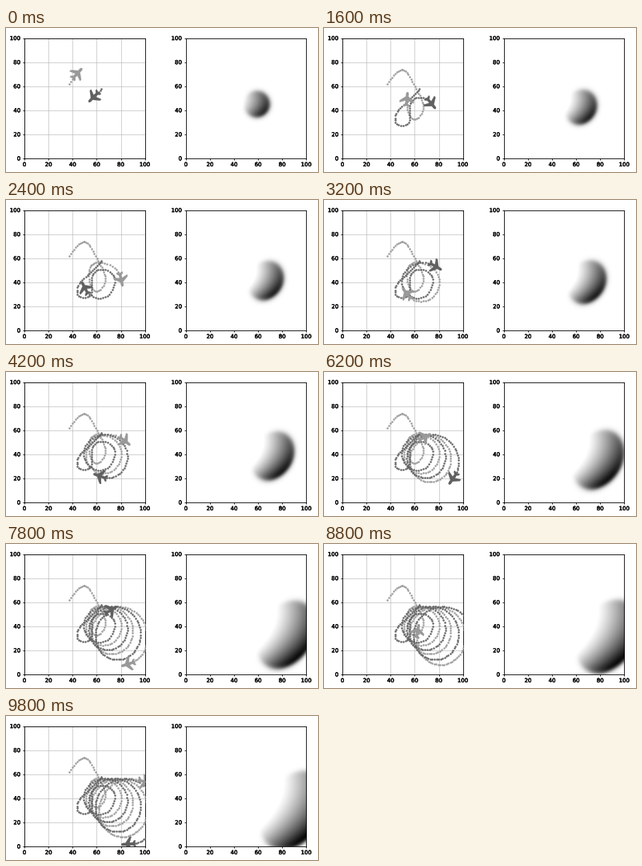
These frames come from a looping animation (390 by 180 pixels, 10 s). A matplotlib script:

```python
import numpy as np
import matplotlib.pyplot as plt
from matplotlib import patheffects
from matplotlib.animation import FuncAnimation

W, H, DPI = 390, 180, 50
FRAMES, STEP_MS, DOTS = 50, 200, 5

# Opening manoeuvre of each craft: (frame, x, y)
LIGHT_LEAD = [(-1, 37, 62), (1, 50, 73.5), (3, 61.2, 58), (5, 66.3, 39.5),
              (6, 60.5, 32.5), (7, 54.5, 38.5), (8, 53.5, 49)]
DARK_LEAD = [(-1, 64, 58), (1, 50.8, 44.7), (2, 44.5, 37.5), (3, 45, 28.5),
             (4, 53.8, 28.8), (6, 57, 47.5), (8, 73.5, 46)]


def patrol(k, top):
    """Clockwise laps of a growing, drifting ellipse; `top` is a lap start."""
    a = 2 * np.pi * np.log((k + 26) / (top + 26)) / 0.24
    x = 56.7 + 0.66 * k + (12.5 + 0.26 * k) * np.sin(a)
    y = 45.2 - 0.33 * k + (11.5 + 0.32 * k) * np.cos(a)
    return np.c_[k, x, y]


def spline(t, v, s):
    """Natural cubic spline through (t, v), sampled at s."""
    h, n = np.diff(t), len(t)
    a, b = np.eye(n), np.zeros(n)
    for i in range(1, n - 1):
        a[i, i - 1:i + 2] = h[i - 1], 2 * (h[i - 1] + h[i]), h[i]
        b[i] = 6 * ((v[i + 1] - v[i]) / h[i] - (v[i] - v[i - 1]) / h[i - 1])
    m = np.linalg.solve(a, b)
    k = np.clip(np.searchsorted(t, s, side="right") - 1, 0, n - 2)
    hk, l, r = h[k], t[k + 1] - s, s - t[k]
    return ((m[k] * l**3 + m[k + 1] * r**3) / (6 * hk)
            + (v[k] / hk - m[k] * hk / 6) * l
            + (v[k + 1] / hk - m[k + 1] * hk / 6) * r)


# Airplane outline, nose along +x
half = np.array([(1, 0), (.93, .13), (.75, .18), (.4, .18), (-.2, .95),
                 (-.46, .95), (-.16, .18), (-.55, .16), (-.76, .42),
                 (-.98, .42), (-.85, 0)])
PLANE = 6.2 * np.vstack([half, half[-2:0:-1] * (1, -1)])

fig = plt.figure(figsize=(W / DPI, H / DPI), dpi=DPI, facecolor="white")


def panel(left):
    ax = fig.add_axes([left / W, 17 / H, 150.5 / W, 150.4 / H])
    ax.set(xlim=(0, 100), ylim=(0, 100),
           xticks=range(0, 101, 20), yticks=range(0, 101, 20))
    ax.tick_params(width=1.2)
    ax.spines[:].set_linewidth(1.2)
    for label in ax.get_xticklabels() + ax.get_yticklabels():
        label.set_path_effects([patheffects.withStroke(linewidth=0.6,
                                                       foreground="black")])
    return ax


ax_map, ax_field = panel(23.1), panel(224.9)
ax_map.grid(True)
ax_map.set_axisbelow(True)


class Craft:
    def __init__(self, lead, top, color, z):
        t, x, y = np.vstack([lead, patrol(np.arange(10, FRAMES), top)]).T
        s = np.linspace(-1, FRAMES - 1, FRAMES * DOTS + 1)
        self.path = np.c_[spline(t, x, s), spline(t, y, s)]
        self.trail, = ax_map.plot([], [], "o", ms=3.6, mew=0, color=color,
                                  zorder=z)
        self.body, = ax_map.fill(*PLANE.T, color=color, lw=0.3, zorder=z + 2)

    def move(self, frame):
        n = (frame + 1) * DOTS
        self.trail.set_data(*self.path[:n + 1].T)
        step = self.path[n] - self.path[n - 1]
        c, s = step / np.hypot(*step)
        self.body.set_xy(PLANE @ [[c, s], [-s, c]] + self.path[n])


crafts = [Craft(LIGHT_LEAD, 9.9, "#999999", 3),
          Craft(DARK_LEAD, 15, "#606060", 3.5)]

grid = (np.arange(150) + 0.5) / 1.5
X, Y = np.meshgrid(grid, grid)


def plume(sec):
    """Growing, leaning disc: pale curved tail, dark front at lower right."""
    rx, ry = 12 + 1.65 * sec, 12 + 2.25 * sec
    v = (Y - 45 + 1.55 * sec) / ry
    u = (X - 58.5 - 3.1 * sec - 0.9 * sec * v) / rx
    tail = 0.5 + 0.5 * np.exp(-sec / 1.5)
    ramp = (0.9 * u - 0.4 * v + 0.5 * v**2 + tail) / (tail + 0.95)
    edge = 1 / (1 + np.exp((np.hypot(u, v) - 1) * rx + 1.2))
    return np.clip(ramp, 0, 1)**1.15 * edge


image = ax_field.imshow(plume(0), cmap="binary", vmin=0, vmax=1,
                        origin="lower", extent=(0, 100, 0, 100),
                        interpolation="bilinear", aspect="auto")


def draw(frame):
    for craft in crafts:
        craft.move(frame)
    image.set_data(plume(frame * STEP_MS / 1000))
    return []


def reset():
    return draw(0)


anim = FuncAnimation(fig, draw, frames=FRAMES, init_func=reset,
                     interval=STEP_MS, repeat=True, repeat_delay=0)
plt.show()
```
